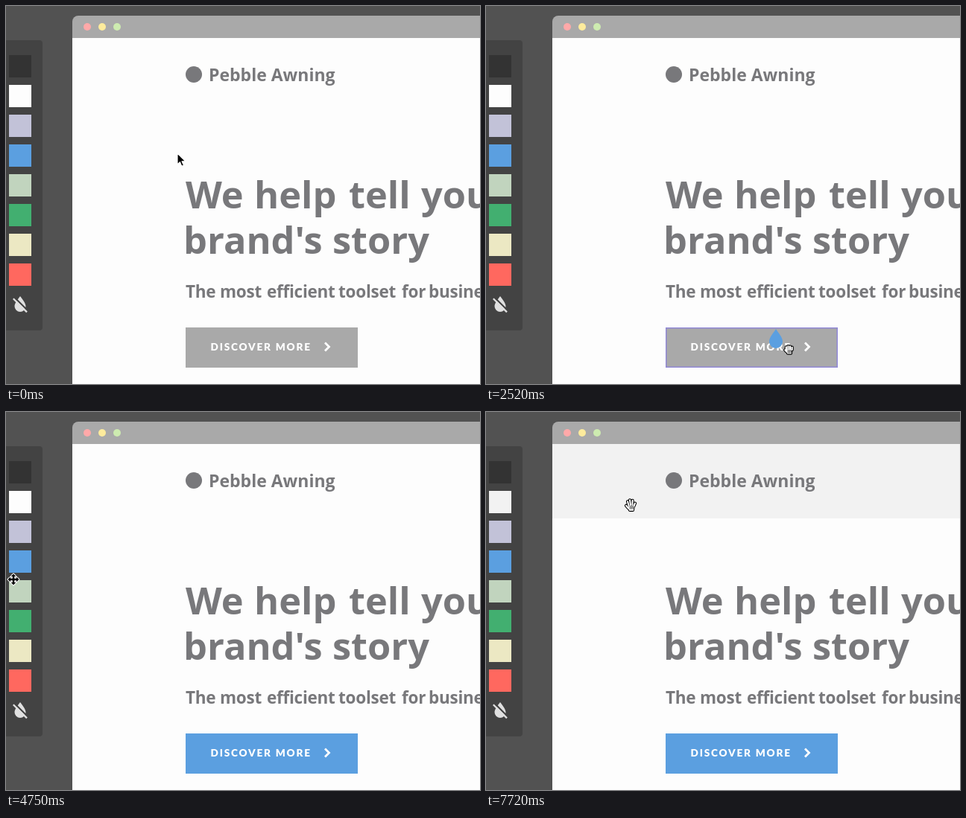
An HTML page that plays this animation: 636x508 px, repeating every 8 s.

```html
<!DOCTYPE html>
<html lang="en">
<head>
<meta charset="utf-8">
<title>Colour drop</title>
<style>
  html, body { margin: 0; width: 100%; height: 100%; overflow: hidden; background: #525252; }
  svg { display: block; width: 100%; height: 100%; }
  text { font-family: "Open Sans", "Noto Sans", sans-serif; font-weight: 700; fill: #78787b; }
  .title { font-size: 50.5px; }
  .sub { font-size: 22.5px; letter-spacing: -.25px; }
  .brand { font-size: 23px; }
  .label { font: 900 13.6px Lato, sans-serif; letter-spacing: 1.8px; fill: #fff; }
  .lit text { stroke: #9188d6; stroke-width: 2px; paint-order: stroke; stroke-linejoin: round; }
  .frame { fill: none; stroke: #9188d6; stroke-width: 1.5px; }
</style>
</head>
<body>
<svg viewBox="0 0 636 508" preserveAspectRatio="xMinYMin meet">
  <defs>
    <clipPath id="clip"><rect x="241" y="432" width="231" height="54"/></clipPath>
    <path id="fingers" d="M-2.4 1L-4-4.8M0 0L-1-6.6M2.4 0L2.6-6.1M4.4 1.5L6-2.4M-2.4 5L-6 .8M-1.8 2H3.6L3 6.8H-1Z"/>
    <path id="knuckles" d="M-3.2 1V-2.6M-.6 0V-3.6M2-.2V-3.4M4.6 1V-2.2M-2.4 3.6L-4.6 1.4M-1.5 1.5H3V5.5H-1Z"/>
    <path id="creases" d="M-.6 5.2V1.5M1.4 5.2V1.5M3.2 5V1.5" stroke="#000" stroke-width=".8"/>
  </defs>
  <rect width="636" height="508" fill="#525252"/>

  <rect x="-6" y="46" width="55" height="390" rx="4" fill="#434343"/>
  <g id="swatches"></g>
  <g transform="translate(19 401)">
    <path d="M0-11C3-7 7.5-1.5 7.5 2.5A7.5 7.5 0 0 1-7.5 2.5C-7.5-1.5-3-7 0-11Z" fill="#e0e0e0"/>
    <path d="M-9-10.8L10 8.2" stroke="#434343" stroke-width="2.3"/>
    <path d="M-9.2-7.8L9 10.4" stroke="#e0e0e0" stroke-width="2.3"/>
  </g>

  <path d="M89 508V21A8 8 0 0 1 97 13H636V508Z" fill="#a9a9a9"/>
  <circle cx="109" cy="28" r="5" fill="#ffa9a9"/>
  <circle cx="129" cy="28" r="5" fill="#fdeb9c"/>
  <circle cx="149" cy="28" r="5" fill="#cdebb0"/>
  <rect x="89" y="43" width="547" height="465" fill="#fdfdfd"/>
  <rect id="header" x="89" y="43" width="547" height="100" fill="#f2f2f2"/>
  <rect id="headerFrame" class="frame" x="89.75" y="43.75" width="555" height="98.5"/>

  <circle cx="252" cy="92" r="11" fill="#78787b"/>
  <text class="brand" x="272" y="101">Pebble Awning</text>
  <g id="copy"></g>

  <rect x="241" y="432" width="231" height="54" fill="#a9a9a9"/>
  <circle id="ripple" cx="429" cy="478" fill="#5b9fe0" clip-path="url(#clip)"/>
  <rect id="buttonFrame" class="frame" x="241.75" y="432.75" width="229.5" height="52.5"/>
  <text class="label" x="274.5" y="463">DISCOVER MORE</text>
  <path d="M428 452.5L433.5 458L428 463.5" fill="none" stroke="#fff" stroke-width="2.8"/>

  <path id="drop" d="M0-13C3-8 9-2 9 4A9 9 0 0 1-9 4C-9-2-3-8 0-13Z"/>
  <g id="cursor" stroke-linejoin="round" stroke-linecap="round">
    <path id="arrow" d="M0 0V14.8L3.4 11.6L5.8 17.2L8.4 16.1L6 10.7H10.6Z" fill="#000" stroke="#fff" stroke-width="1.1"/>
    <path id="move" d="M0-7.5L3.2-4H1.2V-1.2H4V-3.2L7.5 0L4 3.2V1.2H1.2V4H3.2L0 7.5L-3.2 4H-1.2V1.2H-4V3.2L-7.5 0L-4-3.2V-1.2H-1.2V-4H-3.2Z" fill="#000" stroke="#fff" stroke-width="2" paint-order="stroke"/>
    <g id="hand">
      <use href="#fingers" fill="#000" stroke="#000" stroke-width="4.2"/>
      <use href="#fingers" fill="#fff" stroke="#fff" stroke-width="2.1"/>
      <use href="#creases"/>
    </g>
    <g id="fist">
      <use href="#knuckles" fill="#000" stroke="#000" stroke-width="4.4"/>
      <use href="#knuckles" fill="#fff" stroke="#fff" stroke-width="2.2"/>
      <use href="#creases"/>
    </g>
  </g>
</svg>
<script>
const LOOP = 8000, TICK = 148.3;
const BLUE = '#5b9fe0', PALE = '#f2f2f2';
const $ = id => document.getElementById(id);
const show = (id, on) => $(id).setAttribute('visibility', on ? 'visible' : 'hidden');

function add(parent, tag, attrs, text) {
  const el = document.createElementNS('http://www.w3.org/2000/svg', tag);
  for (const key in attrs) el.setAttribute(key, attrs[key]);
  if (text) el.textContent = text;
  return parent.appendChild(el);
}

const swatches = ['#333', '#fdfdfd', '#c2c2d8', BLUE, '#c1d4be', '#42af70', '#ece8c3', '#ff685f']
  .map((fill, i) => add($('swatches'), 'rect', { x: 4, y: 66 + 40 * i, width: 30, height: 30, fill }));

function line(cls, y, words) {
  for (const [x, word] of words) add($('copy'), 'text', { class: cls, x, y }, word);
}
line('title', 272, [[241, 'We'], [333, 'help'], [460, 'tell'], [557, 'your']]);
line('title', 333, [[238, "brand's"], [438, 'story']]);
line('sub', 392, [[241, 'The'], [287, 'most'], [350, 'efficient'], [446, 'toolset'], [531, 'for'], [567, 'businesses']]);

// Pointer path: tick, x, y
const path = [
  [0, 230, 198], [1, 228, 198], [2, 200, 194], [4, 105, 222], [6, 45, 262], [7, 14, 183],
  [8, 14, 200], [9, 14, 202], [13, 14, 202], [14, 120, 290], [15, 313, 392], [16, 385, 445],
  [18, 427, 477], [23, 427, 477], [25, 380, 450], [29, 147, 306], [32, 10, 225], [33, 12, 207],
  [37, 20, 364], [39, 24, 322], [45, 15, 150], [46, 15, 122], [47, 50, 118], [50, 194, 125], [54, 194, 125]
];

function pointerAt(k) {
  const i = Math.max(1, path.findIndex(p => p[0] >= k));
  const [k0, x0, y0] = path[i - 1], [k1, x1, y1] = path[i];
  const f = (k - k0) / (k1 - k0);
  return [x0 + (x1 - x0) * f, y0 + (y1 - y0) * f];
}

function shapeAt(k, x, y, dragging) {
  if (dragging) return 'fist';
  if (k === 22 || k >= 52) return 'hand';
  if (x > 49 || y < 46 || y > 436) return 'arrow';
  const onSwatch = x >= 4 && x <= 34 && (y - 66) % 40 <= 30;
  return onSwatch ? 'hand' : 'move';
}

function draw(time) {
  const k = Math.min(53, Math.floor((time % LOOP + 8) / TICK));
  const [x, y] = pointerAt(k);
  const within = (a, b) => k >= a && k < b;
  const dragging = within(14, 22) || within(46, 52);
  const shape = shapeAt(k, x, y, dragging);

  for (const id of ['arrow', 'move', 'hand', 'fist']) show(id, id === shape);
  $('cursor').setAttribute('transform', `translate(${x} ${y})`);

  show('drop', dragging);
  $('drop').setAttribute('transform', `translate(${x - 17} ${y - 14})`);
  $('drop').setAttribute('fill', k < 22 ? BLUE : PALE);

  $('copy').setAttribute('class', k === 15 ? 'lit' : '');
  show('buttonFrame', within(16, 22));
  show('headerFrame', within(48, 52));
  show('header', k >= 52);
  swatches[1].setAttribute('fill', k >= 46 ? PALE : '#fdfdfd');
  $('ripple').setAttribute('r', k < 22 ? 0 : Math.min(240, 10 + 55 * (k - 22)));
}

const start = performance.now();
function loop() {
  draw(performance.now() - start);
  requestAnimationFrame(loop);
}
loop();
</script>
</body>
</html>
```
